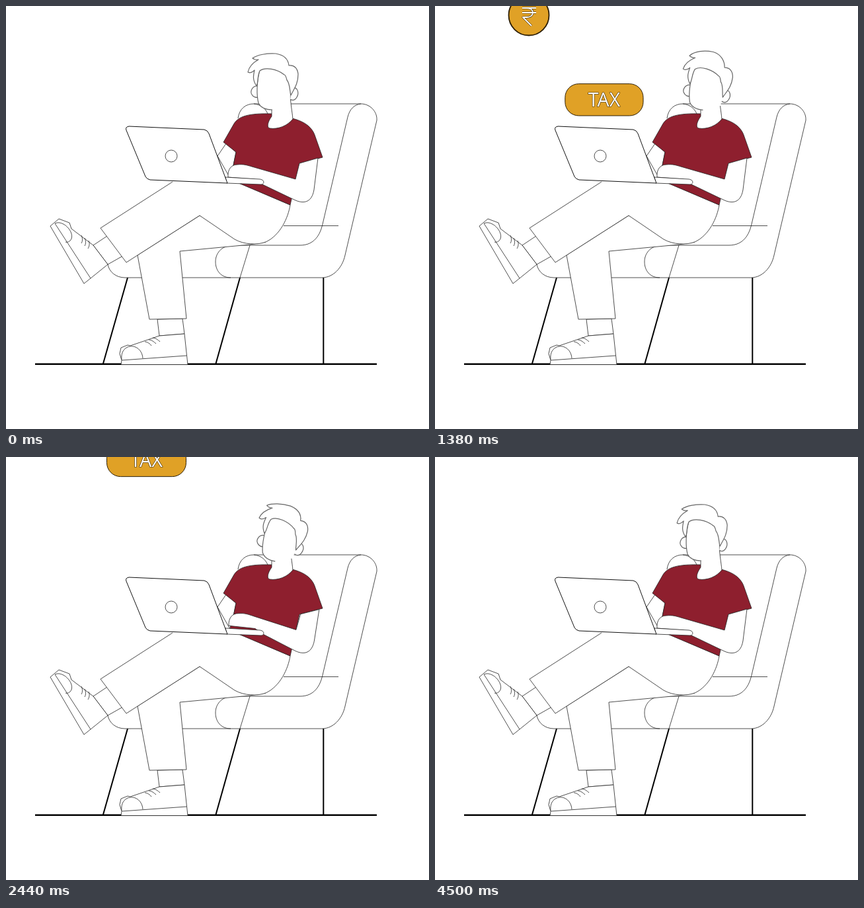
These frames come from a looping animation (640x640 px, 4520 ms). An HTML page:

```html
<!DOCTYPE html>
<html lang="en">
<head>
<meta charset="utf-8">
<title>Working from the armchair</title>
<style>
  html, body { margin: 0; width: 100%; height: 100%; overflow: hidden; background: #fff; }
  svg { display: block; width: 100vw; height: 100vh; }
  .line { fill: none; }
  .thick { fill: none; stroke: #000; stroke-width: 2; }
  .gold { fill: #e0a126; stroke: #2b1d05; }
  #head { stroke: #666; stroke-width: 1.2; }
  text { font: 500 29px "Open Sans", sans-serif; text-anchor: middle; fill: #fff;
         stroke: #3a2806; stroke-width: 1.2; paint-order: stroke; }
</style>
</head>
<body>
<svg viewBox="0 0 640 640" fill="#fff" stroke="#222" stroke-width=".8" stroke-linejoin="round">
  <!-- floor and chair -->
  <path stroke="#888" stroke-width="1" d="M44 540.5H561"/>
  <path class="thick" d="M44 542H561M184 411L147 541M354 411L317.5 541M480.3 411V541"/>
  <path d="M351 170C353 155 363 148 375 148H537C551 148 562 160 561 173L513 377C509 396 495 411 478 411H180C166 411 156 402 154 391"/>
  <path class="line" d="M375 148C385 149 392 154 396 163M537 148C527 149 520 156 517 168L479 330C474 352 462 362 445 362H342C326 363 317 374 317 387C317 400 325 411 340 411M420 332.5H503M369 362L354 411"/>

  <!-- standing leg -->
  <path d="M229 474L232 499L270 496L267 473Z"/>
  <path d="M232 499L188 514L184 513L174 517L172 526L175 536L174 542.6H275L270 496Z"/>
  <path class="line" d="M175 536L273 529M175 535C172 509 205 508 207 533M210 508C214 508 218 511 220 514M216 505C220 505 224 508 227 511M222 502C226 502 230 505 233 508"/>
  <path d="M293 317L199 377L217 474L273 473L263 371L369 361L393 357Z"/>

  <!-- crossed leg -->
  <path d="M153 348L132 362L154 391L177 378Z"/>
  <path d="M67 333L80 322L96 328L99 337L132 362L154 391L118 420Z"/>
  <path class="line" d="M74 329L128 412M74 329C86 323 103 341 99 352C97 357 92 358 90 357M114 347C116 351 116 356 114 359M119 351C121 355 121 360 119 363M125 355C127 359 126 364 124 367"/>
  <path d="M252 266L143 336L182 388L293 317L346 353C360 361 380 362 393 357C415 347 427 320 430 301L340 262"/>

  <!-- torso -->
  <path d="M333 208L320 227L340 262L344 241L348 221Z"/>
  <path fill="#8e1f2e" d="M403 163L433 170C453 175 463 184 467 195L479 229L444 238L430 301L338 262L344 241L348 221L329 206L345 178C352 167 366 162 403 163Z"/>
  <path d="M402 155V167C396 175 394 184 399 185C412 187 426 181 434 171C433 160 430 145 430 130"/>

  <g id="coin">
    <circle class="gold" r="30.5" stroke-width="1.8"/>
    <g fill="none">
      <path id="rupee" stroke="#3a2806" stroke-width="3" d="M-10-11H11M-10-4H11M-10-11H-3C9-11 9 3-3 3H-9L4 16"/>
      <path stroke="#fff" stroke-width="1.8" d="M-10-11H11M-10-4H11M-10-11H-3C9-11 9 3-3 3H-9L4 16"/>
    </g>
  </g>
  <g id="pill">
    <rect class="gold" x="-60" y="-24.5" width="120" height="49" rx="21" stroke-width="1"/>
    <text y="9.8">TAX</text>
  </g>

  <!-- laptop and typing arm -->
  <path id="arm" d="M336 259C335 247 341 240 350 240C360 239 365 241 372 243L438 262L444 238L472 230L466 278C463 296 452 300 438 294L388 270L376 262Z"/>
  <path d="M332 259L384 262C392 263 391 270 386 270L334 268Z"/>
  <path stroke="#111" stroke-width="1" d="M186 182L300 187Q305 188 307 193L335 268L218 263Q213 262 211 258L182 188Q180 183 186 182Z"/>
  <circle cx="250" cy="227" r="9"/>

  <g id="head">
    <path d="M380 121C372 121 369 130 372 134C374 138 379 139 382 138M433 124C441 122 444 131 440 138C438 142 434 144 430 141"/>
    <path stroke="none" d="M384 97C379 115 379 135 382 147C386 155 394 157 403 157L429 148L430 130L423 100Z"/>
    <path class="line" d="M384 97C379 115 379 135 382 147C386 155 394 157 403 157"/>
    <path id="hair"/>
  </g>
</svg>
<script>
  const LOOP = 4520, HEAD_PEAK = 2500, GROW = 670, TYPING = 780;
  const el = id => document.getElementById(id);
  const place = (id, value) => el(id).setAttribute("transform", value);
  const clamp = v => Math.max(0, Math.min(1, v));

  // Rises in a straight line while growing to full size.
  function rise(id, t, start, x, y, vx, vy) {
    const age = t - start;
    place(id, `translate(${x + vx * age} ${y + vy * age}) scale(${clamp(age / GROW)})`);
  }

  function hairPath(lift) {
    return `M384 98C380 106 382 115 379 121C373 112 374 106 376 97C372 101 369 102 366 100
      C368 90 375 85 382 81C378 82 374 80 373 79C380 ${74 - lift} 395 ${71 - lift} 408 ${72 - lift}
      C420 ${74 - lift} 427 80 428 90C436 89 441 94 442 103C442 118 436 125 431 135
      C429 128 430 118 425 112C424 108 423 104 421 104C410 95 392 92 384 98Z`;
  }

  function draw(now) {
    const t = Math.floor(now % LOOP / 20) * 20;
    const swing = t < HEAD_PEAK ? t / HEAD_PEAK : (LOOP - t) / (LOOP - HEAD_PEAK);
    place("head", `rotate(${9.8 * swing} 400 183)`);
    place("hair", `rotate(${3.5 * swing} 431 135)`);
    el("hair").setAttribute("d", hairPath(6 * Math.min(clamp(t / 450), clamp((HEAD_PEAK - t) / 2050))));

    const tap = t < 4 * TYPING ? Math.max(0, Math.sin(t / TYPING * 2 * Math.PI)) : 0;
    place("arm", `rotate(${2.5 * tap} 455 290)`);

    rise("coin", t, 30, 306.7, 227.3, -.122, -.158);
    rise("pill", t, 720, 283, 227, -.041, -.129);
    requestAnimationFrame(draw);
  }
  requestAnimationFrame(draw);
</script>
</body>
</html>
```
